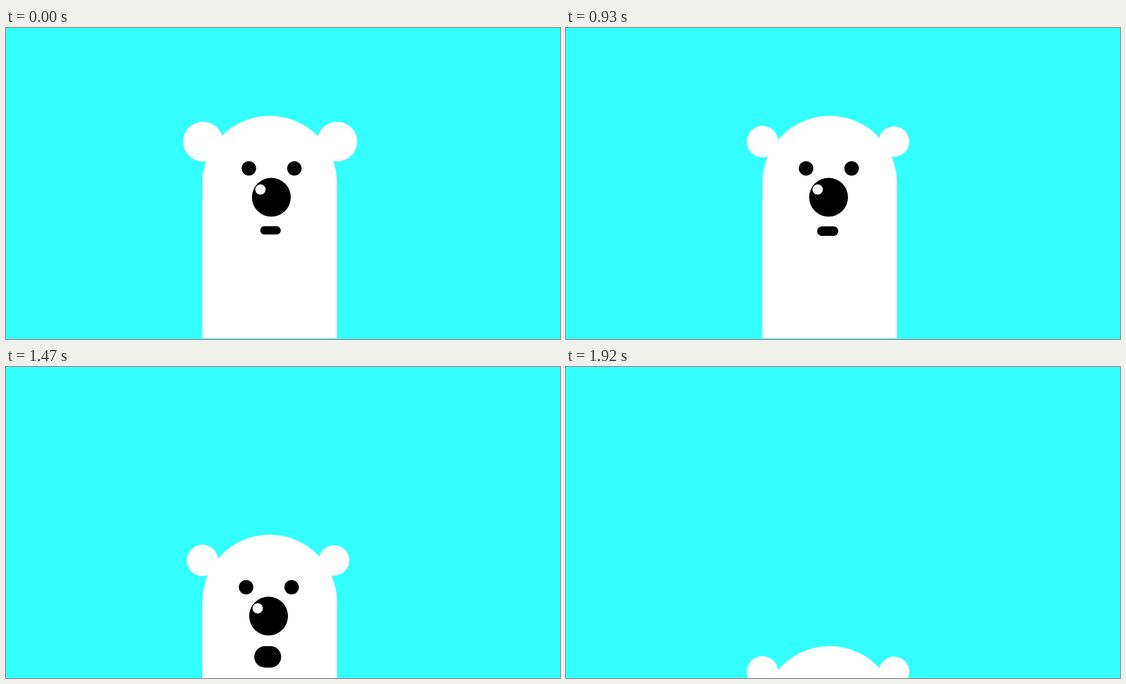
Write an HTML page with a canvas that moves like this. It is 998 px wide and 561 px high and loops after 1.95 s.

```html
<!DOCTYPE html>
<html>
<head>
<meta charset="utf-8">
<style>
  html, body { margin: 0; width: 100%; height: 100%; overflow: hidden; background: #3ff; }
  canvas { display: block; }
</style>
</head>
<body>
<canvas id="stage" width="998" height="561"></canvas>
<script>
const ctx = document.getElementById('stage').getContext('2d');
const STEP = 30, STEPS = 65;

// Linear progress from 0 to 1 between two steps.
const ramp = (n, from, to) => Math.min(1, Math.max(0, (n - from) / (to - from)));

function dot(x, y, r, color) {
  ctx.fillStyle = color;
  ctx.beginPath();
  ctx.arc(x, y, r, 0, 2 * Math.PI);
  ctx.fill();
}

function box(x, y, w, h, radii, color) {
  ctx.fillStyle = color;
  ctx.beginPath();
  ctx.roundRect(x, y, w, h, radii);
  ctx.fill();
}

function drawHead(right, left, settle) {
  box(353.6, 158.4, 242.7, 401.2, [121.35, 121.35, 0, 0], '#fff');
  dot(355 - 6 * right + 5 * left, 204.9, 36 - 12 * left + 4.4 * settle, '#fff');
  dot(596.6 - 5.6 * right, 204.9, 36 - 7.2 * right + 5.5 * left - 6.8 * settle, '#fff');
}

function drawFace(open) {
  for (const side of [-1, 1]) dot(0.5 + 41 * side, 253.3, 13, '#000');
  dot(0, 305.3, 35, '#000');
  dot(-19.6, 291.3, 9.3, '#fff');

  const w = 37 + 11.4 * open, h = 15 + 23.6 * open;
  box(-1.5 - w / 2, 357.5 + 2.1 * open, w, h, h / 2, '#000');
}

function draw(n) {
  // The bear looks right, then left, faces front, opens its mouth and ducks away.
  const right = ramp(n, 0, 9), left = ramp(n, 9, 19), settle = ramp(n, 19, 30);
  const open = ramp(n, 30, 40);
  const duck = ramp(n, 39, 49), rise = ramp(n, 49, 54), leave = ramp(n, 54, 64);

  ctx.fillStyle = '#3ff';
  ctx.fillRect(0, 0, 998, 561);
  ctx.save();
  ctx.translate(0, 144 * duck - 29 * rise + 230 * leave);
  drawHead(right, left, settle);
  ctx.translate(478 + 18 * right - 35.2 * left + 12.2 * settle, 0);
  drawFace(open);
  ctx.restore();
}

const start = performance.now();
function tick() {
  draw(Math.floor((performance.now() - start) / STEP) % STEPS);
  requestAnimationFrame(tick);
}
tick();
</script>
</body>
</html>
```
